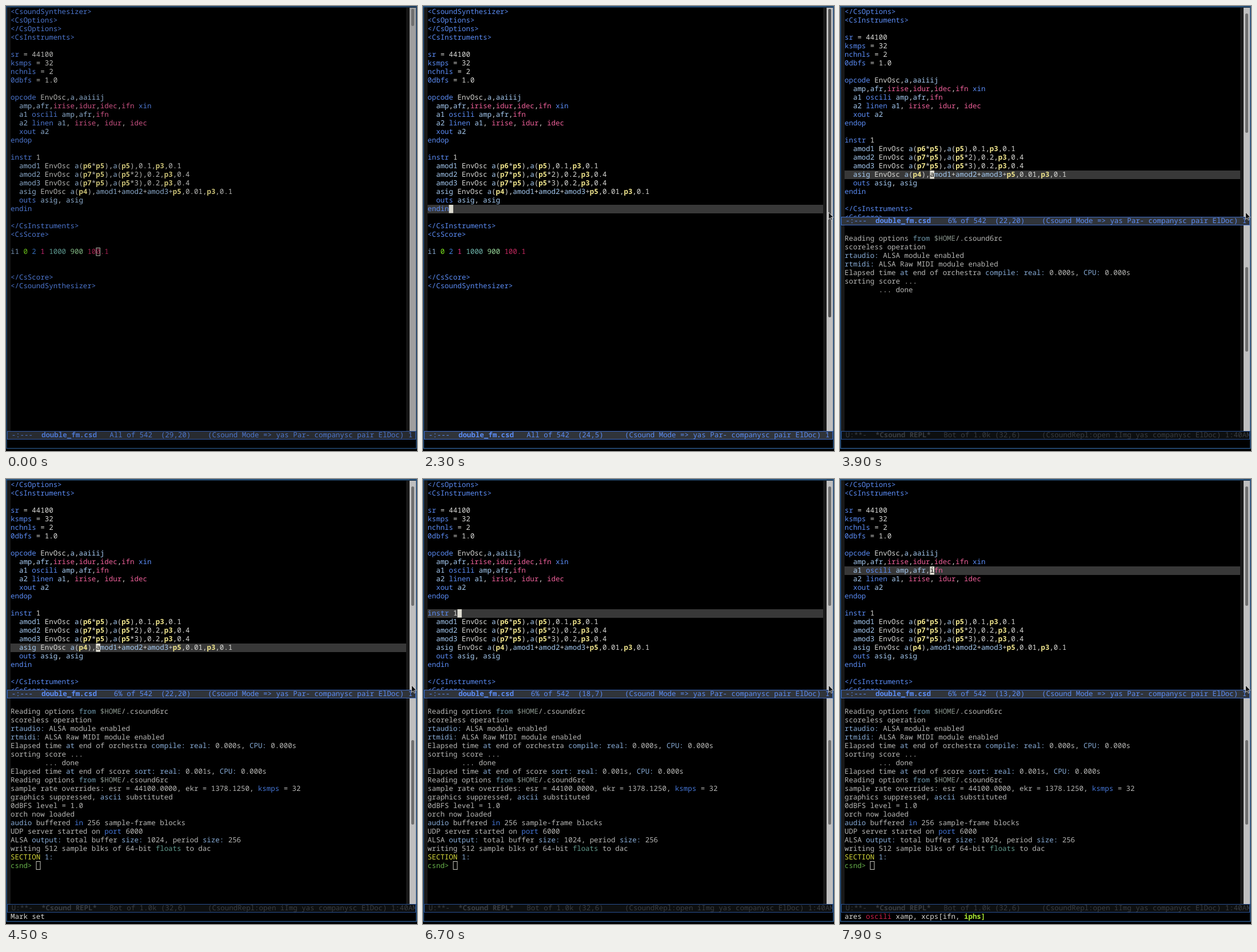
These frames come from a looping animation (719 by 779 pixels, 8000 ms). An HTML page:

```html
<!DOCTYPE html>
<html lang="en">
<head>
<meta charset="utf-8">
<title>Csound editing session</title>
<style>
html, body { margin: 0; width: 100%; height: 100%; overflow: hidden; background: #000; }
svg { display: block; }
text {
  font: 12.45px "Noto Sans Mono", "DejaVu Sans Mono", monospace;
  white-space: pre; fill: #d9d9d6; text-rendering: geometricPrecision;
}
.key { fill: #5b8cf5; }
.var { fill: #a6cbf3; }
.irate { fill: #f0619b; }
.pfield { fill: #efe48c; font-weight: bold; }
.bold { font-weight: bold; }
.repl text { fill: #b7b7b5; }
.repl .var { fill: #87abd6; }
.repl .key { fill: #4576d6; }
.repl .from { fill: #709aae; }
.repl .path { fill: #87938b; }
.repl .type { fill: #619a8c; }
.repl .section { fill: #d6da3c; }
.repl .prompt { fill: #67b04a; }
.mode text { fill: #5b8cf5; }
.mode.idle text { fill: #383c41; }
</style>
</head>
<body>
<svg id="stage" width="719" height="779" viewBox="0 0 719 779">
  <defs>
    <clipPath id="pane"><rect id="paneBox" x="2" y="3" width="715"/></clipPath>
    <clipPath id="bar"><rect x="2" y="0" width="714" height="779"/></clipPath>
  </defs>
  <rect width="719" height="779"/>
  <path d="M2 3H8V744H2ZM700 3H706V744H700Z" fill="#191919"/>
  <rect x="706" y="3" width="12" height="741" fill="#bfbfbf"/>
  <rect id="thumb" x="709" width="5" rx="2.5"/>
  <g clip-path="url(#pane)">
    <rect id="band" x="8" width="692" height="15" fill="#383838"/>
    <g id="code"></g>
    <rect id="block" width="7.5" height="14.5" fill="#dfddd2"/>
    <text id="under" style="fill:#111"></text>
  </g>
  <g id="replPane" class="repl">
    <rect x="706" y="384" width="12" height="360" fill="#bfbfbf"/>
    <rect x="709" y="457" width="5" height="148" rx="2.5" fill="#707070"/>
    <g id="repl"></g>
    <rect id="replCursor" x="53" y="669.5" width="7" height="14" fill="none" stroke="#c8c8c0"/>
  </g>
  <g id="topMode" class="mode"></g>
  <g id="lowMode" class="mode idle"></g>
  <text id="echo" x="8" y="770"></text>
  <rect width="719" height="2.5" fill="#28527a"/>
  <path d="M1 1V774.5H718V1" fill="none" stroke="#2d5b8f" stroke-width="1.5"/>
  <path id="pointer" d="M709.5 361V373.5L712.4 370.8L714.3 375L716.2 374.1L714.3 370H718Z"
    fill="#111" stroke="#eee" stroke-width=".8"/>
  <rect id="dim" width="719" height="779"/>
</svg>
<script>
const $ = id => document.getElementById(id);
const LOOP = 8000, STEP = 100, CHAR = 7.47, ROW = 15, LEFT = 8, GOAL = 20;

const code = `<CsoundSynthesizer>
<CsOptions>
</CsOptions>
<CsInstruments>

sr = 44100
ksmps = 32
nchnls = 2
0dbfs = 1.0

opcode EnvOsc,a,aaiiij
  amp,afr,irise,idur,idec,ifn xin
  a1 oscili amp,afr,ifn
  a2 linen a1, irise, idur, idec
  xout a2
endop

instr 1
  amod1 EnvOsc a(p6*p5),a(p5),0.1,p3,0.1
  amod2 EnvOsc a(p7*p5),a(p5*2),0.2,p3,0.4
  amod3 EnvOsc a(p7*p5),a(p5*3),0.2,p3,0.4
  asig EnvOsc a(p4),amod1+amod2+amod3+p5,0.01,p3,0.1
  outs asig, asig
endin

</CsInstruments>
<CsScore>

i1 0 2 1 1000 900 100.1


</CsScore>
</CsoundSynthesizer>`.split("\n");

const output = `Reading options from $HOME/.csound6rc
scoreless operation
rtaudio: ALSA module enabled
rtmidi: ALSA Raw MIDI module enabled
Elapsed time at end of orchestra compile: real: 0.000s, CPU: 0.000s
sorting score ...
        ... done
Elapsed time at end of score sort: real: 0.001s, CPU: 0.000s
Reading options from $HOME/.csound6rc
sample rate overrides: esr = 44100.0000, ekr = 1378.1250, ksmps = 32
graphics suppressed, ascii substituted
0dBFS level = 1.0
orch now loaded
audio buffered in 256 sample-frame blocks
UDP server started on port 6000
ALSA output: total buffer size: 1024, period size: 256
writing 512 sample blks of 64-bit floats to dac
SECTION 1:
csnd>`.split("\n");

const codeRules = {
  key: /<\/?\w+>|\b(?:sr|ksmps|nchnls|0dbfs|opcode|endop|instr|endin|xin|xout|oscili|linen|outs)\b/,
  irate: /\b(?:irise|idur|idec|ifn)\b/,
  pfield: /\bp\d\b/,
  var: /\b(?:amp|afr|a[12]?|amod\d|asig|aaiiij)\b/
};
const replRules = {
  key: /\b(?:in|port|ksmps)\b/,
  from: /\bfrom\b/,
  path: /\$HOME/,
  type: /\bfloats\b/,
  section: /^SECTION/,
  prompt: /^csnd>/,
  var: /\b(?:at|audio|ascii)\b|\b(?:rtaudio|rtmidi|compile|real|sort|CPU|output|size|1):/
};
const scoreColors = ["#88a9d0", "#7ee81e", "#3f80dd", "#e32c80", "#6fb6ac", "#9bdc9d", "#c3285e"];

const escape = s => s.replace(/&/g, "&amp;").replace(/</g, "&lt;");
const span = (s, attr) => `<tspan ${attr}>${escape(s)}</tspan>`;
const line = (inner, y, x = LEFT) => `<text x="${x}" y="${y}">${inner}</text>`;

function highlight(s, rules) {
  const any = new RegExp(Object.entries(rules).map(([k, r]) => `(?<${k}>${r.source})`).join("|"), "g");
  let html = "", end = 0;
  for (const m of s.matchAll(any)) {
    const kind = Object.keys(rules).find(k => m.groups[k] !== undefined);
    html += escape(s.slice(end, m.index)) + span(m[0], `class="${kind}"`);
    end = m.index + m[0].length;
  }
  return html + escape(s.slice(end));
}

const score = s => s.split(" ").map((w, i) => span(w, `fill="${scoreColors[i]}"`)).join(" ");

$("code").innerHTML = code.map((s, i) =>
  line(s.startsWith("i1 ") ? score(s) : highlight(s, codeRules), 14.3 + ROW * i)).join("");
$("repl").innerHTML = output.map((s, i) => line(highlight(s, replRules), 410.5 + ROW * i)).join("");

function modeLine(top, flag, name, info, modes, fill, stroke) {
  return `<rect x="2.5" y="${top + .5}" width="714" height="14" fill="${fill}" stroke="${stroke}"/>` +
    `<g clip-path="url(#bar)">` +
    line(flag.padEnd(7) + span(name, 'class="bold"') + "   " + info + modes, top + 11, 9.7) + "</g>";
}

$("lowMode").innerHTML = modeLine(744, "U:**-", "*Csound REPL*", "Bot of 1.0k (32,6)".padEnd(23),
  "(CsoundRepl:open iImg yas companysc ElDoc) 1:40AM", "#0d0f10", "#284f91");

// [time, line]: point moves up through the buffer
const moves = [[0, 29], [1000, 28], [1600, 27], [1800, 26], [2100, 25], [2300, 24], [2500, 23], [2700, 22],
  [6000, 21], [6100, 20], [6400, 19], [6700, 18], [7000, 17], [7200, 16], [7300, 15], [7400, 14], [7500, 13]];
const FOCUS = 400, SPLIT = 3900;
const eldoc = "ares " + span("oscili", 'fill="#cf204f"') + " xamp, xcps[ifn, " +
  span("iphs]", 'class="bold" fill="#a9e834"');

const clamp = v => Math.max(0, Math.min(1, v));
const set = (id, attrs) => Object.entries(attrs).forEach(([k, v]) => $(id).setAttribute(k, v));
const show = (id, on) => set(id, { visibility: on ? "visible" : "hidden" });

function draw(t) {
  const row = moves.filter(m => m[0] <= t).pop()[1];
  const text = code[row - 1], col = Math.min(GOAL, text.length);
  const split = t >= SPLIT, focused = t >= FOCUS;
  const scroll = split ? 30 : 0;
  const x = LEFT + col * CHAR, y = 3 + ROW * (row - 1) - scroll;

  set("dim", { opacity: .17 * (1 - clamp((t - 100) / 700)) });
  set("paneBox", { height: split ? 367 : 741 });
  set("code", { transform: `translate(0 ${-scroll})` });
  set("band", { y });
  show("band", t >= 1000);

  set("block", focused
    ? { x, y, width: 7.5, height: 14.5, fill: "#dfddd2", stroke: "none" }
    : { x: x + .5, y: y + .5, width: 6.5, height: 13.5, fill: "none", stroke: "#dfddd2" });
  set("under", { x, y: y + 11.3, class: /^p\d/.test(text.slice(col)) ? "bold" : "" });
  $("under").textContent = focused ? text[col] || "" : "";

  set("thumb", split ? { y: 13, height: 209, fill: "#707070" }
    : focused ? { y: 5, height: 540, fill: "#505050" }
    : { y: 5, height: 30, fill: "#858585" });

  const info = (split ? " 6%" : "All") + ` of 542  (${row},${col})`;
  $("topMode").innerHTML = modeLine(split ? 369 : 744, "-:---", "double_fm.csd", info.padEnd(23),
    "(Csound Mode => yas Par- companysc pair ElDoc) 1", "#30343a", "#3f6bc4");

  show("replPane", split);
  show("lowMode", split);
  const shown = Math.floor((t - SPLIT) / STEP) * 6 + 7;
  [...$("repl").children].forEach((el, i) => el.setAttribute("opacity", i < shown ? 1 : 0));
  set("replCursor", { opacity: shown >= output.length ? 1 : 0 });
  $("echo").innerHTML = t >= 7900 ? eldoc : t >= 4300 && t < 6000 ? "Mark set" : "";
  show("pointer", focused);
}

let start, last = -1;
function tick(now) {
  start ??= now;
  const t = Math.floor(((now - start) % LOOP) / STEP) * STEP;
  if (t !== last) draw(last = t);
  requestAnimationFrame(tick);
}
draw(0);
requestAnimationFrame(tick);
</script>
</body>
</html>
```
